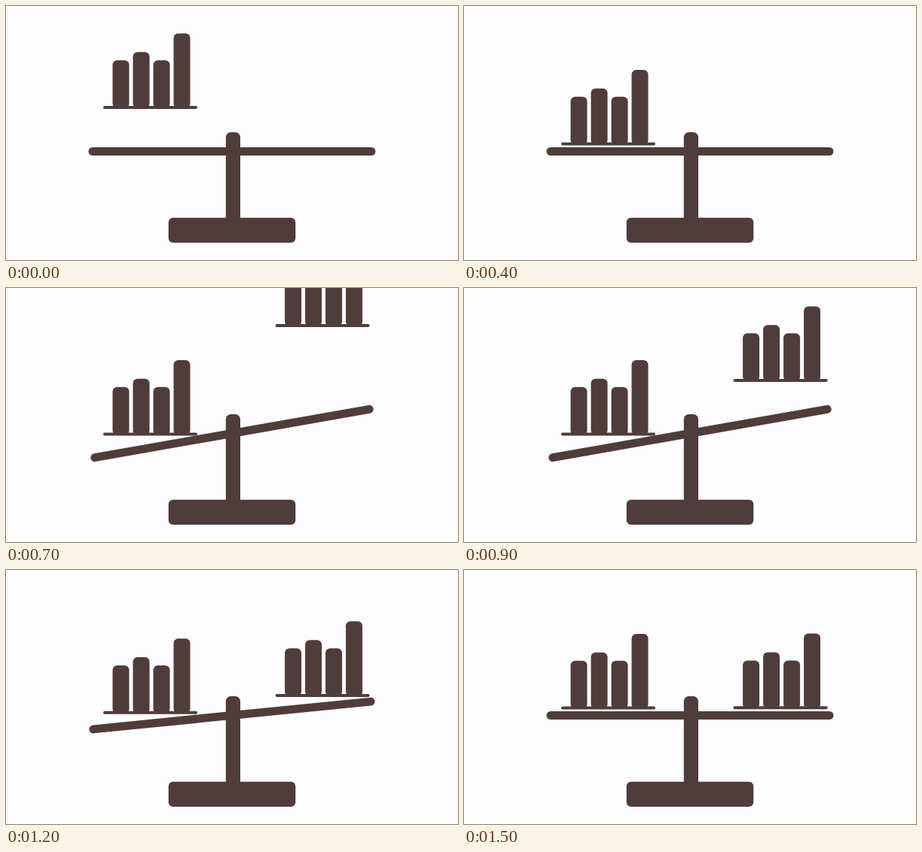
An HTML page for the animation above (2 s loop, 600 px wide and 338 px high).

```html
<!DOCTYPE html>
<html lang="en">
<head>
<meta charset="utf-8">
<title>Balance</title>
<style>
  html, body { margin: 0; width: 100%; height: 100%; overflow: hidden; background: #fdfcfe; }
  svg { display: block; width: 100%; height: 100%; fill: #503c3b; }
</style>
</head>
<body>
<svg viewBox="0 0 600 338">
  <defs>
    <g id="chart">
      <rect x="12.5" y="-62.7" width="22" height="63.7" rx="6"/>
      <rect x="39.5" y="-73.7" width="22" height="74.7" rx="6"/>
      <rect x="66.5" y="-62.7" width="22" height="63.7" rx="6"/>
      <rect x="93.5" y="-98.6" width="22" height="99.6" rx="6"/>
      <rect y="-2" width="125" height="4" rx="2"/>
    </g>
  </defs>
  <use id="left" href="#chart"/>
  <use id="right" href="#chart"/>
  <rect id="beam" x="109.5" y="188" width="381" height="11" rx="5.5"/>
  <rect x="291.8" y="168" width="19.2" height="122" rx="6.5"/>
  <rect x="215.7" y="281.8" width="168.6" height="33.2" rx="6"/>
</svg>
<script>
const LOOP = 2000, STEP = 100;
const [left, right, beam] = ['left', 'right', 'beam'].map(id => document.getElementById(id));

// Beam angle in degrees as [step, angle] pairs
const tiltKeys = [[0, 0], [4, 0], [6, 10], [9, 10], [10, 9.17], [12, 5.7], [13, 3.26], [15, 0]];

function interpolate(keys, s) {
  const i = Math.max(1, keys.findIndex(([at]) => at >= s));
  const [s0, v0] = keys[i - 1], [s1, v1] = keys[i];
  return v0 + (v1 - v0) * (s - s0) / (s1 - s0);
}

const place = (el, x, y) => el.setAttribute('transform', `translate(${x} ${y})`);

function draw(time) {
  // The picture advances in steps and rests on the last pose
  const s = Math.min(15, Math.floor(time % LOOP / STEP));
  const tilt = interpolate(tiltKeys, s);
  const leftY = s < 4 ? 135 + 9.375 * s + 0.69 * s * s : 183.5 + 1.1 * tilt;
  const rightY = Math.min(50 + 36.5 * (s - 7), 183.2 - 2.85 * tilt);
  place(left, 129, leftY);
  place(right, 357.6, rightY);
  beam.setAttribute('transform', `rotate(${-tilt} 300 193.4)`);
}

const start = performance.now();
function tick() {
  draw(performance.now() - start);
  requestAnimationFrame(tick);
}
tick();
</script>
</body>
</html>
```
